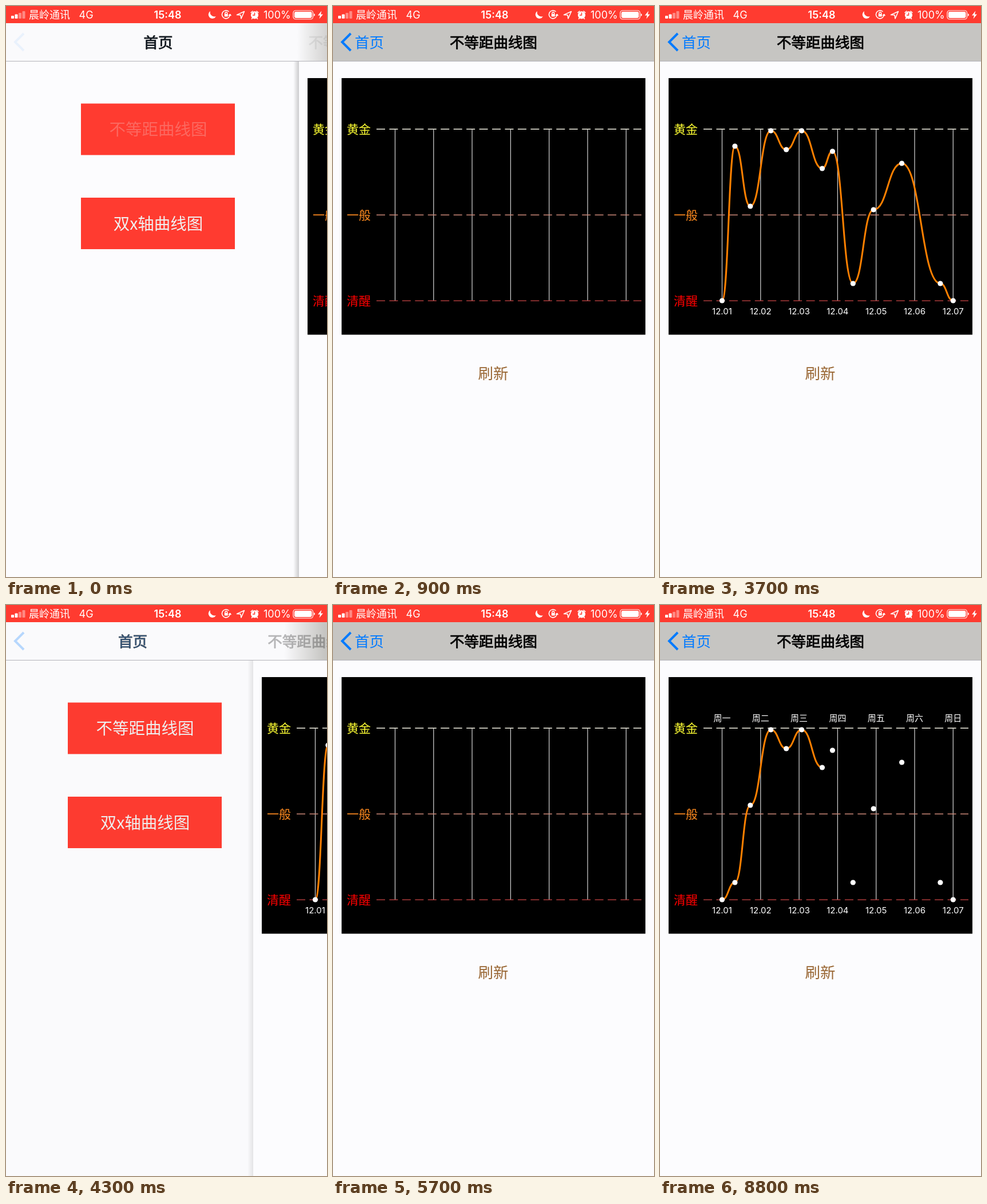
An HTML page for the animation above (8900 ms loop, 561 px wide and 998 px high).

```html
<!DOCTYPE html>
<html lang="zh">
<head>
<meta charset="utf-8">
<title>曲线图</title>
<style>
  html, body { margin: 0; width: 100%; height: 100%; overflow: hidden; background: #fcfcfe; }
  svg { display: block; width: 100vw; height: 100vh; }
  text { font-family: "Noto Sans CJK SC", "Noto Sans CJK", "Noto Sans", sans-serif; }
  .num { font-family: Inter, Roboto, sans-serif; }
  .mid { text-anchor: middle; }
  .bold { font-weight: 600; }
  .heavy { stroke: #000; stroke-width: .8; }
  .red { fill: #ff3b30; }
  .blue { fill: #007aff; }
  .line { fill: none; stroke: #fff; stroke-width: 1.6; stroke-linecap: round; stroke-linejoin: round; }
</style>
</head>
<body>
<svg viewBox="0 0 561 998" preserveAspectRatio="none">
  <defs>
    <linearGradient id="barFill" gradientUnits="userSpaceOnUse">
      <stop offset="0" stop-color="#fafafc"/>
      <stop offset="1" stop-color="#c6c5c2"/>
    </linearGradient>
    <linearGradient id="edgeFill">
      <stop offset="0" stop-opacity="0"/>
      <stop offset="1"/>
    </linearGradient>
  </defs>

  <rect width="561" height="998" fill="#fcfcfe"/>
  <g id="home">
    <rect class="red" x="146" y="170.500" width="269" height="90"/>
    <rect class="red" x="146" y="335" width="269" height="90"/>
    <g class="mid" fill="#f0f0f0" font-size="28.5">
      <text id="first" x="281" y="226">不等距曲线图</text>
      <text id="second" x="281" y="390.500">双x轴曲线图</text>
    </g>
  </g>
  <rect id="dim" width="561" height="998"/>

  <g id="page">
    <rect id="edge" x="-10" y="97" width="10" height="901" fill="url(#edgeFill)"/>
    <rect y="97" width="561" height="901" fill="#fcfcfe"/>
    <rect x="15" y="126" width="531" height="448.500"/>
    <g id="grid" stroke-width="1.5"></g>
    <g id="plot">
      <path id="curve" fill="none" stroke="#ff8000" stroke-width="3" pathLength="1"/>
      <g id="dots" fill="#fff"></g>
      <g id="dates" class="mid" fill="#fff" font-size="15"></g>
      <g id="weekdays" class="mid" fill="#fff" font-size="15"></g>
    </g>
    <text class="mid" x="280" y="652" font-size="26.5" fill="#996633">刷新</text>
  </g>

  <rect y="30" width="561" height="66" fill="url(#barFill)"/>
  <rect y="96" width="561" height="1" fill="#b2b2b8"/>
  <g font-size="25.500">
    <path id="chevron" d="M31 48 16 63 31 78" fill="none" stroke="#007aff" stroke-width="4"/>
    <g id="homeTitle" class="mid">
      <text id="homeDark" class="heavy" y="72.500">首页</text>
      <text id="homeBlue" class="blue" y="72.500">首页</text>
    </g>
    <text id="pageTitle" class="mid heavy" y="72.500">不等距曲线图</text>
  </g>

  <rect class="red" width="561" height="30"/>
  <g fill="#fff" font-size="18">
    <rect x="9" y="17" width="5" height="5" rx="1"/>
    <rect x="15.500" y="14.500" width="5" height="7.500" rx="1"/>
    <g opacity=".4">
      <rect x="22" y="12" width="5" height="10" rx="1"/>
      <rect x="28.500" y="9" width="5" height="13" rx="1"/>
    </g>
    <text x="40" y="22">晨岭通讯</text>
    <text class="num" x="127.500" y="22">4G</text>
    <text class="num mid bold" x="282.500" y="22">15:48</text>
    <path d="M357 9a7 7 0 1 0 10 9a7.500 7.500 0 0 1-10-9z"/>
    <path class="line" d="M389 9.500A7 7 0 1 0 391.500 15M389.500 16.500 391.500 14.500 393 16.500M383 14v-1.500a1.800 1.800 0 0 1 3.600 0V14"/>
    <rect x="381.800" y="14" width="6" height="4.500" rx=".6"/>
    <path class="line" d="M403.500 15.500 416.500 9.500 411 22 410 15.700z"/>
    <circle cx="434.500" cy="15.800" r="6.600"/>
    <path class="line" d="M428 11.500 431 9M441 11.500 438 9M430.500 21 429.500 22.500M438.500 21 439.500 22.500"/>
    <path d="M434.500 11.500v4.500h-3.500" fill="none" stroke="#ff3b30" stroke-width="1.500"/>
    <text class="num" x="450" y="22">100%</text>
    <rect class="line" x="502" y="8" width="34.500" height="15" rx="4" style="stroke-width:1.200"/>
    <rect x="504" y="10" width="30.500" height="11" rx="2.400"/>
    <path d="M538 13v5q2-.8 2-2.500t-2-2.500z"/>
    <path d="M551.500 8.500 545 16.500h4l-1.500 6 6.500-8h-4z"/>
  </g>
</svg>
<script>
const LOOP = 8900, STEP = 100, WIDTH = 561;
const PUSH_1 = -26.8, POP = 4146.4, PUSH_2 = 4872.4;
const DAY = 67.3, LEFT = 108.5, BASE = 515, RANGE = 300;

// Each refresh: when the plot is cleared, when drawing starts, and how long it takes
const RUNS = [
  { clear: 900, start: 900, span: 900 },
  { clear: 2600, start: 2650, span: 1000 },
  { clear: PUSH_2, start: 5750, span: 1000 },
  { clear: 7100, start: 7150, span: 1000 },
  { clear: 8400, start: 8414, span: 1000 }
];

const days = [0, .333, .733, 1.267, 1.667, 2.067, 2.6, 2.867, 3.4, 3.933, 4.667, 5.667, 6];
const doubleAxis = [0, .1, .55, .99, .88, .99, .77, .87, .1, .53, .8, .1, 0];
const singleAxis = doubleAxis.map((v, i) => i === 1 ? .9 : v);

const $ = id => document.getElementById(id);
const clamp = v => Math.min(1, Math.max(0, v));
const set = (id, attrs) => {
  for (const name in attrs) $(id).setAttribute(name, attrs[name]);
};
const add = (parent, tag, attrs, text = '') => {
  const node = document.createElementNS('http://www.w3.org/2000/svg', tag);
  for (const name in attrs) node.setAttribute(name, attrs[name]);
  node.textContent = text;
  $(parent).append(node);
};

function buildGrid() {
  for (let i = 0; i < 7; i++) {
    const x = LEFT + DAY * i;
    add('grid', 'path', { d: `M${x} 215V515`, stroke: '#c8c8c8', 'stroke-width': 1.3 });
    add('dates', 'text', { x, y: 539, class: 'num' }, '12.0' + (i + 1));
    add('weekdays', 'text', { x, y: 202.5 }, '周' + '一二三四五六日'[i]);
  }
  const levels = [
    ['黄金', '#ffff33', '#f4f2e4'],
    ['一般', '#ff8a1f', '#cc8878'],
    ['清醒', '#ff0000', '#aa3a3a']
  ];
  levels.forEach(([name, color, dash], i) => {
    const y = 215.3 + 150 * i;
    add('grid', 'path', { d: `M76 ${y}H539`, stroke: dash, 'stroke-dasharray': '15 7.45' });
    add('grid', 'text', { x: 24, y: y + 8, fill: color, 'font-size': 21 }, name);
  });
}

function plot(values) {
  const points = values.map((v, i) => [LEFT + DAY * days[i], BASE - RANGE * v]);
  let d = '';
  $('dots').replaceChildren();
  points.forEach(([x, y], i) => {
    if (i) {
      const [px, py] = points[i - 1], mx = (px + x) / 2;
      d += `C${mx} ${py} ${mx} ${y} ${x} ${y}`;
    } else d = `M${x} ${y}`;
    add('dots', 'circle', { cx: x, cy: y, r: 4.6 });
  });
  set('curve', { d });
}

// Critically damped spring: distance still to go, from 1 to 0
function spring(ms, rate) {
  const k = Math.max(0, ms) * .01826 * rate;
  const rest = (1 + k) * Math.exp(-k);
  return rest < .001 ? 0 : rest;
}

function pageRest(t, rate = 1, lag = 0) {
  const move = start => spring(t - start - lag, rate);
  if (t < POP) return move(PUSH_1);
  if (t < PUSH_2) return 1 - move(POP);
  return move(PUSH_2);
}

const pressFade = (t, down, up) => t < down ? 1 : .2 + .8 * clamp((t - up) / 470);

function drawPage(t) {
  const rest = pageRest(t), shown = 1 - rest;
  set('home', { transform: `translate(${Math.round(-.298 * WIDTH * shown)})` });
  set('page', { transform: `translate(${Math.round(WIDTH * rest)})` });
  set('dim', { opacity: .15 * shown ** 2 });
  set('edge', { opacity: .03 + .28 * rest ** 6 });
  set('first', { opacity: pressFade(t, -200, PUSH_1) });
  set('second', { opacity: pressFade(t, 4700, PUSH_2 - 20) });

  const blur = -60 + 621 * rest ** .22;
  set('barFill', { x1: blur - 40, x2: blur + 30 });
}

// The titles trail the page slightly
function drawTitles(t) {
  const rest = pageRest(t, .93, 2), shown = 1 - rest;
  const pressed = t >= 4000 && t < POP ? .3 : 1;
  set('homeTitle', { transform: `translate(${280.5 - 217 * shown})` });
  set('homeDark', { opacity: rest });
  set('homeBlue', { opacity: shown * pressed });
  set('chevron', { opacity: shown * pressed });
  set('pageTitle', { x: 280.5 + 348 * rest, opacity: shown });
}

let currentValues;
function drawChart(t) {
  const second = t >= PUSH_2;
  const values = second ? doubleAxis : singleAxis;
  if (values !== currentValues) plot(currentValues = values);
  const run = RUNS.filter(r => t >= r.clear).pop();
  const visible = run && t > run.start;
  set('plot', { visibility: visible ? 'visible' : 'hidden' });
  set('weekdays', { display: second ? 'inline' : 'none' });
  if (visible) set('curve', { 'stroke-dasharray': `${clamp((t - run.start) / run.span)} 2` });
}

function frame(now) {
  // The picture advances in tenths of a second
  const t = Math.floor((now + 20) / STEP) * STEP % LOOP;
  drawPage(t);
  drawTitles(t);
  drawChart(t);
  requestAnimationFrame(frame);
}

buildGrid();
frame(0);
</script>
</body>
</html>
```
